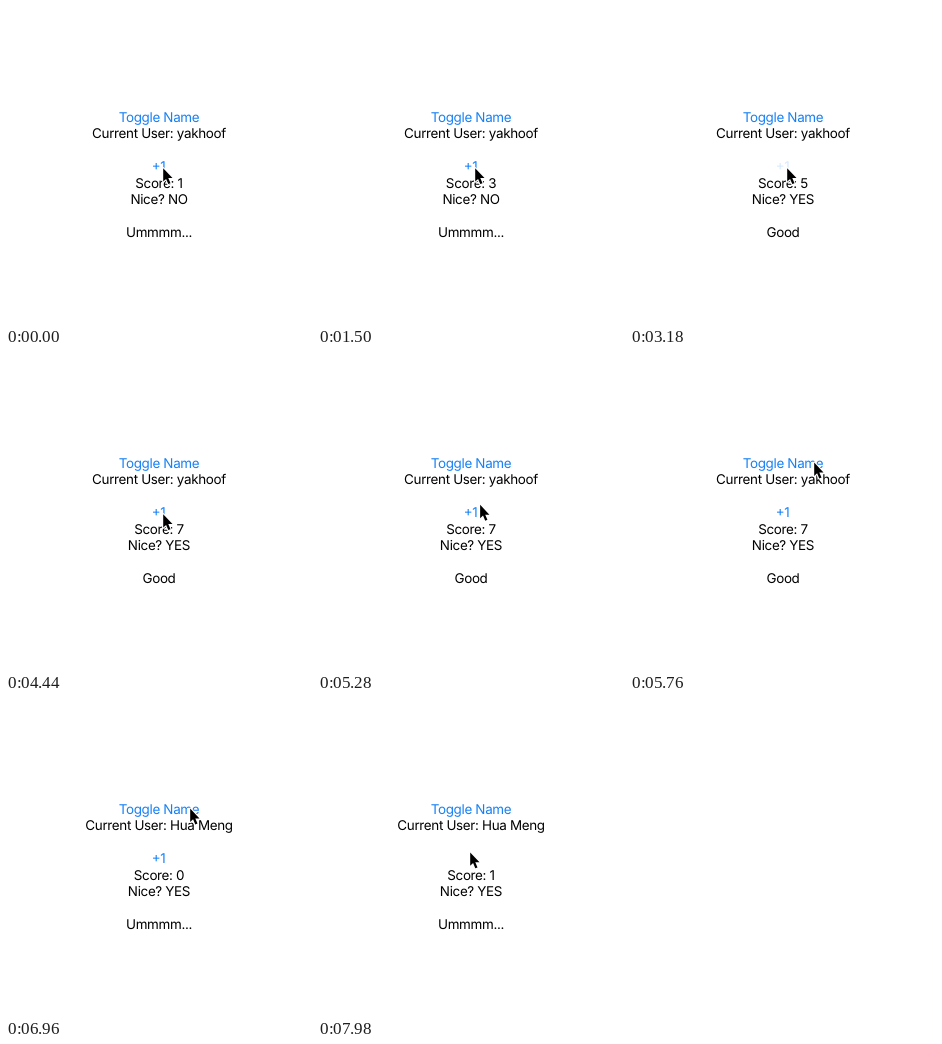
These frames come from a looping animation (306x318 px, 8000 ms). An HTML page:

```html
<!DOCTYPE html>
<html lang="en">
<head>
<meta charset="utf-8">
<title>Score counter</title>
<style>
  html, body { margin: 0; width: 100%; height: 100%; overflow: hidden; background: #fff; }
  svg { display: block; width: 306px; height: 318px; }
  text {
    font: 13.45px Inter, "Liberation Sans", sans-serif;
    letter-spacing: -.34px;
    text-anchor: middle;
    text-rendering: geometricPrecision;
    white-space: pre;
  }
  .button { fill: #1580f5; }
  #plus { font-feature-settings: "case"; }
</style>
</head>
<body>
<svg viewBox="0 0 306 318">
  <rect width="306" height="318" fill="#fff"/>
  <text id="toggle" class="button" x="153" y="115.5">Toggle Name</text>
  <text id="user" x="153" y="132"></text>
  <text id="plus" class="button" x="152.6" y="165">+1</text>
  <text id="score" x="153" y="181.5"></text>
  <text id="nice" x="153" y="198"></text>
  <text id="verdict" x="153" y="231"></text>
  <g id="cursor">
    <path id="arrow" d="M0 0V13.4L2.9 10.7L5.1 15.9L7.3 15L5.1 9.9H9.3Z"
      fill="#000" stroke="#fff" stroke-width="2.2" stroke-linejoin="round" paint-order="stroke"/>
  </g>
</svg>
<script>
const LOOP = 8000, STEP = 60, FADE = 360;
const $ = id => document.getElementById(id);

// Each press: time down, time up, opacity while held
const plusPresses = [
  [300, 420, .17], [960, 1140, .17], [1680, 1860, .17], [2400, 2580, .17],
  [3180, 3300, .17], [3900, 4080, .17], [7440, 7560, .17], [7980, 8100, 0]
];
const togglePresses = [[5820, 6000, .17]];
const switchTime = togglePresses[0][1];

// Each move: start, end, from, to
const moves = [
  [5100, 5760, [157.2, 162.2], [184.2, 110.6]],
  [7140, 7380, [184.2, 110.6], [152.2, 154.4]]
];

const clamp = v => Math.max(0, Math.min(1, v));
const smooth = v => v * v * (3 - 2 * v);

function buttonOpacity(presses, t) {
  const press = presses.filter(([down]) => down <= t).pop();
  if (!press) return 1;
  const [, up, low] = press;
  return low + (1 - low) * smooth(clamp((t - up) / FADE));
}

function cursorAt(t) {
  const [start, end, from, to] = moves.filter(m => m[0] <= t).pop() || moves[0];
  const k = smooth(clamp((t - start) / (end - start)));
  return from.map((v, i) => v + (to[i] - v) * k);
}

function setText(id, value) {
  if ($(id).textContent !== value) $(id).textContent = value;
}

function render(time) {
  const t = Math.floor(time % LOOP / STEP) * STEP;
  const switched = t >= switchTime;
  const since = switched ? switchTime : 0;
  const clicks = plusPresses.filter(([, up]) => up > since && up <= t).length;
  const score = clicks + (switched ? 0 : 1);
  const nice = switched || score > 3;

  setText('user', 'Current User: ' + (switched ? 'Hua Meng' : 'yakhoof'));
  setText('score', 'Score: ' + score);
  setText('nice', 'Nice? ' + (nice ? 'YES' : 'NO'));
  setText('verdict', score > 3 ? 'Good' : 'Ummmm...');
  $('plus').setAttribute('opacity', buttonOpacity(plusPresses, t));
  $('toggle').setAttribute('opacity', buttonOpacity(togglePresses, t));
  $('cursor').setAttribute('transform', `translate(${cursorAt(t)})`);
}

const begin = performance.now();
function tick() {
  render(performance.now() - begin);
  requestAnimationFrame(tick);
}
tick();
</script>
</body>
</html>
```
